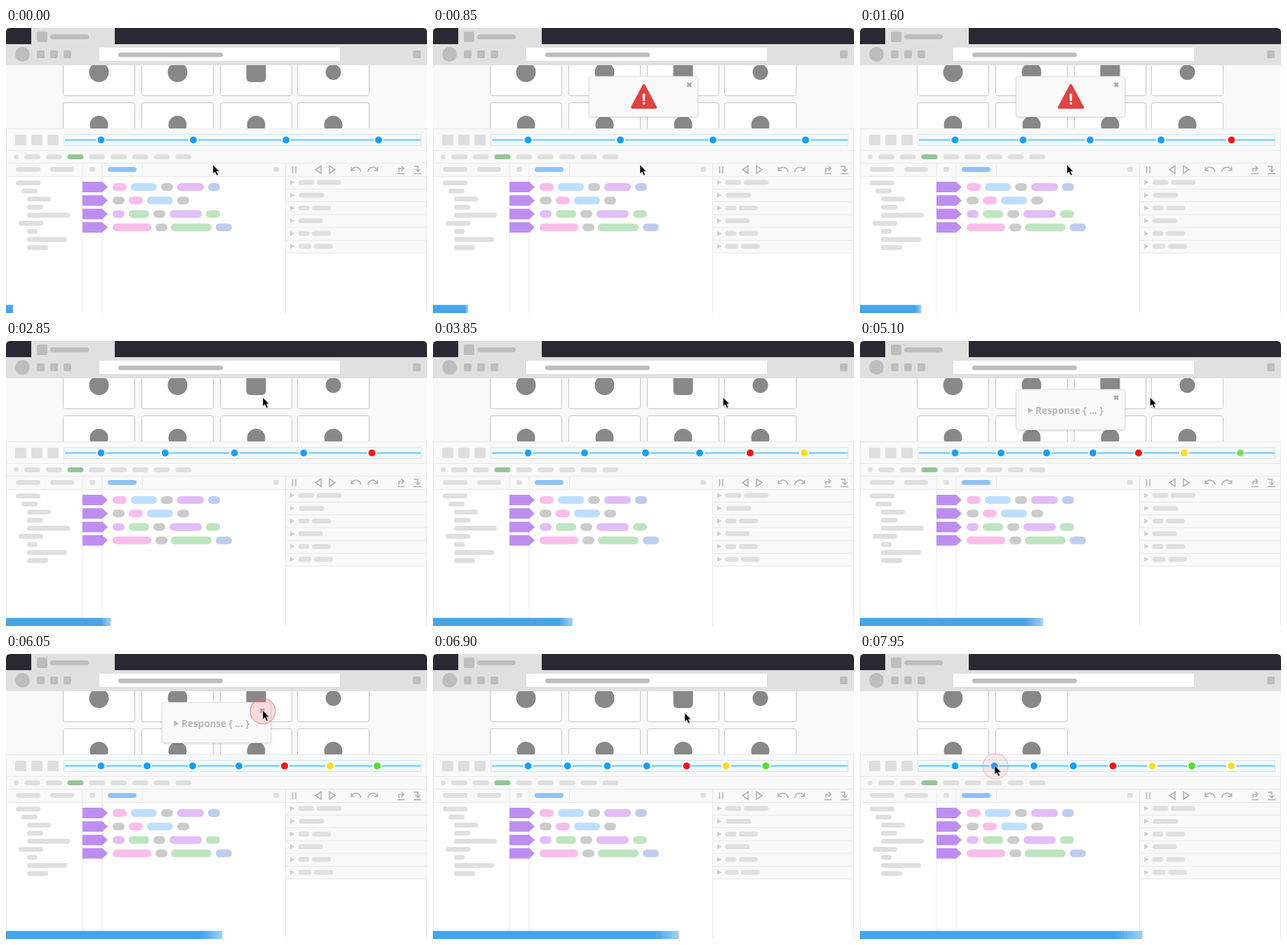
Recreate the animation shown at these times as an HTML page. Size 600 by 406 pixels, loop 8 s.

```html
<!DOCTYPE html>
<html lang="en">
<head>
<meta charset="utf-8">
<title>Timeline debugger</title>
<style>
  html, body { margin: 0; width: 100%; height: 100%; overflow: hidden; background: #fff; }
  svg { display: block; width: 600px; height: 406px; }
  text { font: bold 13.5px "Open Sans", "Noto Sans", sans-serif; fill: #b9b9b9; }
  .rule { stroke: #e8e8e8; fill: none; }
  .icon { stroke: #b0b0b0; fill: none; stroke-width: 1.5; }
</style>
</head>
<body>
<svg viewBox="0 0 600 406">
  <defs>
    <clipPath id="pageClip"><rect y="53" width="600" height="90"/></clipPath>
    <filter id="shadow" x="-10%" y="-20%" width="120%" height="150%">
      <feDropShadow dx="0" dy="1" stdDeviation="1.5" flood-opacity=".15"/>
    </filter>
  </defs>

  <path d="M0 24V6Q0 0 6 0H594Q600 0 600 6V24Z" fill="#2a2832"/>
  <path d="M36 0H155V23H600V53H0V23H36Z" fill="#e0e0e0"/>
  <rect x="133" y="28" width="343" height="19" fill="#fff"/>
  <circle cx="23.5" cy="37.5" r="10.5" fill="#bdbdbd"/>
  <g id="chrome"></g>

  <rect y="53" width="600" height="90" fill="#f9f9f9"/>
  <g clip-path="url(#pageClip)"><g id="early"></g><g id="late"></g></g>

  <rect y="143" width="600" height="69" fill="#f9f9f9"/>
  <rect x="399" y="211" width="201" height="110" fill="#f9f9f9"/>
  <path class="rule" d="M0 143.5H600M0 174.5H600M0 192.5H600M0 211.5H600M.5 143V406M599.5 143V406
    M109 192V406M137 192V406M194.5 192V211M398.5 192V406
    M399 229.5H600M399 247.5H600M399 266H600M399 284H600M399 302.5H600M399 320.5H600"/>
  <rect x="82.5" y="151.5" width="509" height="16" fill="#f0f9fe" stroke="#d5e5ee"/>
  <path d="M84 159.5H591" stroke="#6bc5f8" stroke-width="2"/>
  <g id="panels"></g>

  <path d="M408.5 197V207M413 197V207" class="icon" stroke-width="2"/>
  <path class="icon" d="M449 196.5V207L441 201.7ZM461 196.5V207L469 201.7Z"/>
  <path id="undo" class="icon" d="M492 198V203H497M492.5 202.5Q495 197.5 500 198.5Q505 199.5 506 205"/>
  <path class="icon" d="M529.5 198V203H524.5M529 202.5Q526.5 197.5 521.5 198.5Q516.5 199.5 515.5 205"/>
  <path class="icon" d="M558 207.5H568M560 205V200H566M563.5 196.5L567 200L563.5 203.5
    M581 207.5H592M581 197H587V204M583.5 201L587 204.5L590.5 201"/>

  <g id="popups">
    <rect x="222.5" y="69" width="155" height="57.5" rx="4" fill="#f9f9f9" stroke="#dedede" filter="url(#shadow)"/>
    <path d="M362.5 78L368 83.5M368 78L362.5 83.5" stroke="#ababab" stroke-width="2.6"/>
    <g id="warning">
      <path d="M300.5 82L317 113H284Z" fill="#df4343" stroke="#df4343" stroke-width="4" stroke-linejoin="round"/>
      <path d="M299 94H302L301.5 104H299.5Z" fill="#fff" stroke="#fff" stroke-width=".7"/>
      <circle cx="300.5" cy="107.5" r="1.7" fill="#fff"/>
    </g>
    <g id="response">
      <path d="M239.5 95L246.5 99L239.5 103Z" fill="#b9b9b9"/>
      <text x="250" y="104">Response { ... }</text>
    </g>
  </g>

  <g id="dots"></g>
  <rect id="progress" y="394.5" width="1" height="11.5" fill="#46a4e8"/>
  <g id="ripples"></g>
  <path id="cursor" d="M0 0V12.6L2.9 10L5.1 15L7.4 14L5.2 9.2H9Z" fill="#000" stroke="#fff" stroke-width=".5"/>
</svg>

<script>
const LOOP = 8000;
const byId = id => document.getElementById(id);

function add(parent, tag, attrs) {
  const el = document.createElementNS('http://www.w3.org/2000/svg', tag);
  for (const name in attrs) el.setAttribute(name, attrs[name]);
  return byId(parent)?.appendChild(el) ?? parent.appendChild(el);
}

const bar = (parent, x, y, width, height, fill = '#dfdfdf', rx = height / 2) =>
  add(parent, 'rect', { x, y, width, height, rx, fill });

// Each step is [time, value, easing towards the next step].
function play(el, prop, steps) {
  const all = [[0, steps[0][1]], ...steps, [LOOP, steps.at(-1)[1]]];
  const frames = all.map(([time, value, easing = 'linear']) =>
    ({ offset: time / LOOP, [prop]: value, easing }));
  el.animate(frames, { duration: LOOP, iterations: Infinity }).startTime = 0;
}

const at = (x, y = 0) => `translate(${x}px, ${y}px)`;

// Browser chrome
bar('chrome', 44, 5, 15, 15, '#bdbdbd', 2);
bar('chrome', 63, 9, 55, 7, '#bdbdbd');
bar('chrome', 160, 35, 149, 6.5, '#bdbdbd');
for (const x of [44, 63, 82, 580]) bar('chrome', x, 32, 11, 11, '#bdbdbd', 2);

// Web page cards
[81.5, 193.5, 305.5, 415.5].forEach((x, col) => {
  const group = col < 2 ? 'early' : 'late';
  for (const y of [40.5, 106.5])
    add(group, 'rect', { x, y, width: 102, height: 56, rx: 3, fill: '#fff', stroke: '#c6c6c6' });
  const cx = x + 51;
  if (col === 2) bar(group, cx - 14, 49, 28, 28, '#888', 6);
  else add(group, 'circle', { cx, cy: 63, r: col === 3 ? 11 : 14, fill: '#888' });
  add(group, 'circle', { cx, cy: 138, r: 13, fill: '#888' });
});

// Toolbars
for (const x of [13, 36, 59]) bar('panels', x, 152, 16, 15, '#dedede', 2);
bar('panels', 11, 180, 7, 7);
for (let i = 0; i < 8; i++) bar('panels', 26 + i * 30.75, 180, 23, 7, i === 2 ? '#94c596' : '#dfdfdf');
bar('panels', 14, 198, 35, 7);
bar('panels', 63, 198, 34, 7);
bar('panels', 119, 198, 8, 7, '#dfdfdf', 2);
bar('panels', 145, 198, 41, 7, '#8fc1fc');
bar('panels', 381, 198, 8, 7, '#dfdfdf', 2);

// Source tree
[[14, 35], [22, 23], [30, 34], [30, 23], [30, 61], [18, 35], [30, 15], [30, 57], [30, 30]]
  .forEach(([x, width], i) => bar('panels', x, 217.3 + i * 11.5, width, 7));

// Code lines with breakpoints
const tint = { pink: '#fabdea', blue: '#bddeff', gray: '#cbcbcb', violet: '#e2bdf7', green: '#bfe4c0', navy: '#becdee' };
[
  [['pink', 152, 20], ['blue', 178, 37], ['gray', 221, 17], ['violet', 244, 38], ['navy', 288, 17]],
  [['gray', 152, 17], ['pink', 175, 20], ['blue', 201, 37], ['gray', 244, 17]],
  [['violet', 152, 17], ['green', 175, 29], ['gray', 210, 17], ['violet', 233, 46], ['green', 285, 20]],
  [['pink', 152, 55], ['gray', 213, 17], ['green', 235, 58], ['navy', 299, 23]]
].forEach((line, i) => {
  const y = 226.5 + i * 19.2;
  add('panels', 'path', { d: `M109 ${y - 7.5}H137L145 ${y}L137 ${y + 7.5}H109Z`, fill: '#bd8ef0' });
  for (const [color, x, width] of line) bar('panels', x, y - 5.5, width, 11, tint[color]);
});

// Scope list
[[23, 35], [36], [16, 27], [35], [16, 27], [19, 27]].forEach((widths, i) => {
  const y = 220 + i * 18.2;
  add('panels', 'path', { d: `M405 ${y - 3.5}L411.5 ${y}L405 ${y + 3.5}Z`, fill: '#cfcfcf' });
  let x = i === 1 ? 417.5 : 416.5;
  for (const width of widths) {
    bar('panels', x, y - 3.5, width, 7);
    x += width + 3.5;
  }
});

// Timeline: old dots make room, then a new one slides in from the right.
const ENTRY_X = 580;
const layouts = [
  { xs: [135.5, 267, 399, 531] },
  { xs: [135.5, 228, 328, 429, 529], shift: 900, stagger: 200, enter: 1200 },
  { xs: [135.5, 216, 303, 380, 452, 529], shift: 2800, enter: 3200 },
  { xs: [135.5, 201, 266, 332, 397, 462, 529], shift: 4500, enter: 4900 },
  { xs: [135.5, 191.5, 248, 304, 360.5, 416.5, 473, 529], shift: 6500, enter: 6900 }
];
const dotColors = ['#169ffb', '#169ffb', '#169ffb', '#169ffb', '#f91313', '#ffdd22', '#59dc2d', '#ffdd22'];

dotColors.forEach((fill, i) => {
  const dot = add('dots', 'circle', { cy: 159.5, r: 6, fill, stroke: '#fff', 'stroke-width': 2 });
  const born = layouts.findIndex(layout => i < layout.xs.length);
  const { xs, enter } = layouts[born];
  const moves = born
    ? [[enter, at(ENTRY_X), 'ease'], [enter + 450, at(xs[i])]]
    : [[0, at(xs[i])]];
  if (born) play(dot, 'opacity', [[enter, 0, 'ease'], [enter + 450, 1]]);
  for (let n = born + 1; n < layouts.length; n++) {
    const { xs, shift, stagger = 0 } = layouts[n];
    const start = shift + stagger * (xs.length - 2 - i);
    moves.push([start, at(layouts[n - 1].xs[i]), 'ease'], [start + 500, at(xs[i])]);
  }
  play(dot, 'transform', moves);
});

// Pop-ups
play(byId('popups'), 'opacity',
  [[250, 0], [400, 1], [2350, 1], [2500, 0], [3950, 0], [4100, 1], [6100, 1], [6250, 0]]);
play(byId('warning'), 'opacity', [[3000, 1], [3000, 0]]);
play(byId('response'), 'opacity', [[3000, 0], [3000, 1]]);
play(byId('late'), 'opacity', [[7600, 1], [7600, 0]]);

// Pointer and clicks
const closeSpot = at(366, 80.5), besideSpot = at(413.5, 80.5);
play(byId('cursor'), 'transform', [
  [1700, at(295, 195), 'ease-in-out'], [2250, closeSpot],
  [3000, closeSpot, 'ease-in-out'], [3500, besideSpot],
  [5400, besideSpot, 'ease-in-out'], [5900, closeSpot],
  [6800, closeSpot, 'ease-in-out'], [7500, at(192, 159)]
]);
for (const [time, cx, cy] of [[2270, 366, 81.5], [5990, 366, 81.5], [7610, 193, 160]]) {
  const ripple = add('ripples', 'circle', {
    cx, cy, r: 18, fill: '#ee7777', 'fill-opacity': .22, stroke: '#e57373', 'stroke-opacity': .6, 'stroke-width': 1.5
  });
  const end = Math.min(time + 550, LOOP);
  play(ripple, 'opacity', [[time, 0], [time + 50, 1], [time + 150, 1], [end, cx < 200 ? .4 : 0]]);
}

play(byId('progress'), 'transform', [[0, 'scaleX(7.8)'], [LOOP, 'scaleX(403.3)']]);
</script>
</body>
</html>
```
